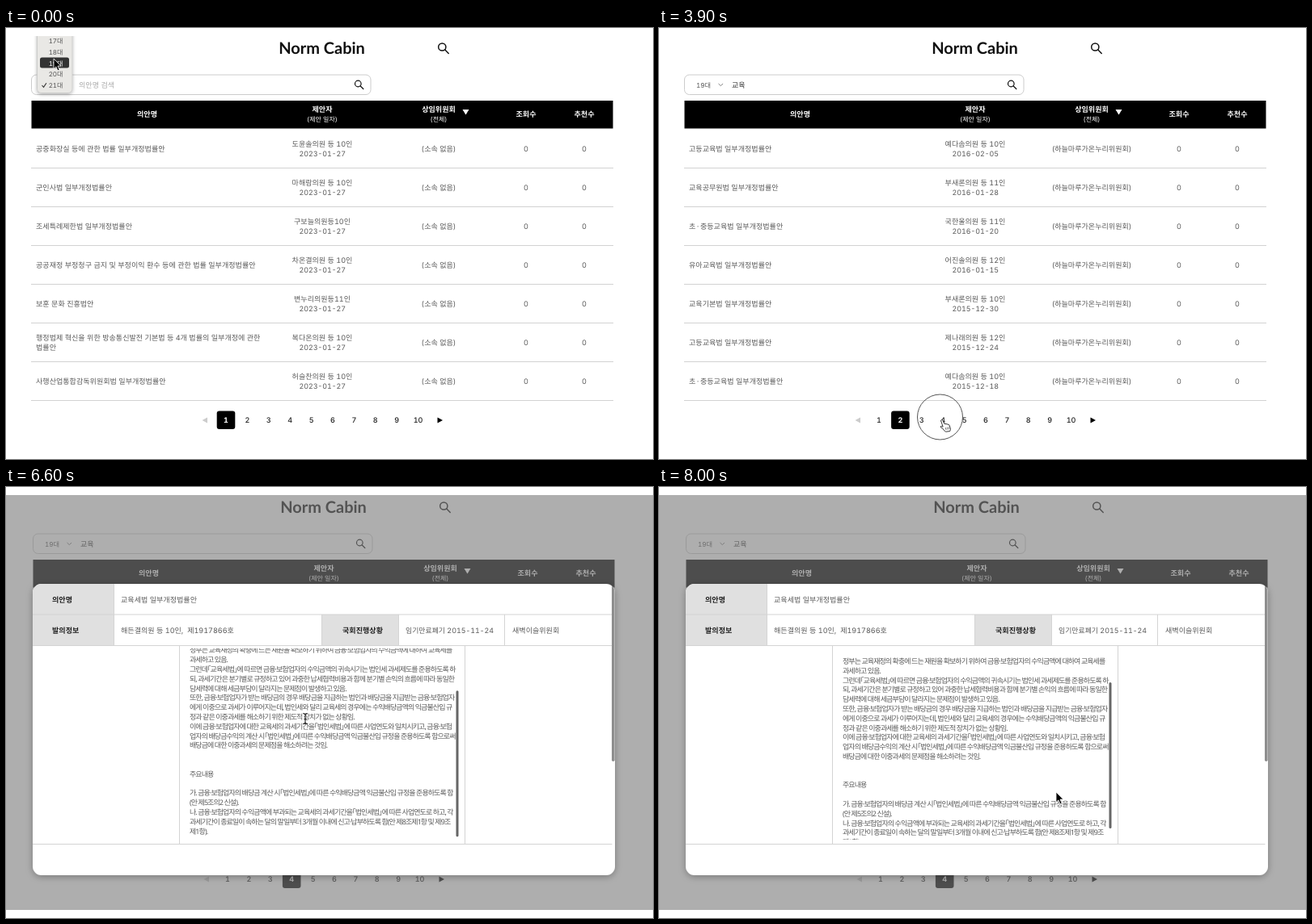
These frames come from a looping animation (800x534 px, 8.1 s). An HTML page:

```html
<!DOCTYPE html>
<html lang="ko">
<head>
<meta charset="utf-8">
<title>Norm Cabin</title>
<style>
  html, body { margin: 0; width: 100%; height: 100%; overflow: hidden; background: #fff; }
  svg { display: block; width: 100%; height: 100%; }
  text {
    font-family: Inter, "Noto Sans CJK KR", "Noto Sans CJK", sans-serif;
    font-size: 9.05px; fill: #5a5a5a; text-rendering: geometricPrecision;
    font-variant-numeric: tabular-nums; white-space: pre;
  }
  .mid { text-anchor: middle; }
  .bold { font-weight: 700; }
  .logo { font: 700 20px Lato, sans-serif; fill: #111; }
  .body text {
    font-family: "Noto Sans", "Noto Sans CJK KR", "Noto Sans CJK", sans-serif;
    font-size: 9px; letter-spacing: -.93px; font-feature-settings: "halt";
  }
  .body .bold { font-size: 9.05px; letter-spacing: -.15px; fill: #222; }
</style>
</head>
<body>
<svg id="stage" viewBox="0 0 800 534" preserveAspectRatio="none"></svg>
<script>
const LOOP = 8100, STEP = 100;

const COMMITTEES = {
  n: '소속 없음', h: '푸른솔빛위원회', f: '들꽃바람구름노을물결위원회',
  p: '새벽이슬위원회', i: '은빛모래언덕위원회', e: '하늘마루가온누리위원회'
};

// title | proposer | date | committee; "/" breaks a title
const LISTS = {
  recent: `공중화장실 등에 관한 법률 일부개정법률안|도윤솔의원 등 10인|2023-01-27|n
군인사법 일부개정법률안|마해람의원 등 10인|2023-01-27|n
조세특례제한법 일부개정법률안|구보늘의원등10인|2023-01-27|n
공공재정 부정청구 금지 및 부정이익 환수 등에 관한 법률 일부개정법률안|차온결의원 등 10인|2023-01-27|n
보훈 문화 진흥법안|변누리의원등11인|2023-01-27|n
행정법제 혁신을 위한 방송통신발전 기본법 등 4개 법률의 일부개정에 관한/법률안|복다온의원 등 10인|2023-01-27|n
사행산업통합감독위원회법 일부개정법률안|허슬찬의원 등 10인|2023-01-27|n`,
  term: `아동복지법 일부개정법률안|현새봄의원 등 10인|2016-05-12|h
자유무역협정 체결에 따른 농어업인 등의 지원에 관한 특별법 일부개정법률/안|추로운의원 등 13인|2016-04-29|f
조세특례제한법 일부개정법률안|고담별의원 등 21인|2016-04-29|p
자유무역협정 체결에 따른 농어업인 등의 지원에 관한 특별법 일부개정법률/안|호빛찬의원 등 13인|2016-04-29|f
대·중소기업 상생협력 촉진에 관한 법률 일부개정법률안|우든솔의원 등 20인|2016-04-29|i
아동복지법 일부개정법률안|소아름의원 등 15인|2016-04-27|h
약사법 일부개정법률안|설마루의원 등 10인|2016-04-19|h`,
  first: `지방교육자치에 관한 법률 일부개정법률안|라온별의원 등 27인|2016-03-29|e
지방교육정책 지원 특별회계법안|라온별의원 등 27인|2016-03-29|e
지방교육재정교부금법 일부개정법률안|라온별의원 등 27인|2016-03-29|e
교육기본법 일부개정법률안|어진솔의원 등 23인|2016-02-29|e
고등교육법 일부개정법률안|어진솔의원 등 23인|2016-02-29|e
초·중등교육법 일부개정법률안|어진솔의원 등 23인|2016-02-29|e
유아교육법 일부개정법률안|어진솔의원 등 23인|2016-02-29|e`,
  second: `고등교육법 일부개정법률안|예다솜의원 등 10인|2016-02-05|e
교육공무원법 일부개정법률안|부새론의원 등 11인|2016-01-28|e
초·중등교육법 일부개정법률안|국한울의원 등 11인|2016-01-20|e
유아교육법 일부개정법률안|어진솔의원 등 12인|2016-01-15|e
교육기본법 일부개정법률안|부새론의원 등 10인|2015-12-30|e
고등교육법 일부개정법률안|제나래의원 등 12인|2015-12-24|e
초·중등교육법 일부개정법률안|예다솜의원 등 10인|2015-12-18|e`,
  fourth: `고등교육법 일부개정법률안|예다솜의원 등 10인|2015-11-25|e
교육세법 일부개정법률안|해든결의원 등 10인|2015-11-24|p
초·중등교육법 일부개정법률안|국한울의원 등 11인|2015-11-20|e
교육공무원법 일부개정법률안|부새론의원 등 11인|2015-11-18|e
공장밀집지역 교육지원 특별법안|부새론의원 등 14인|2015-11-18|e
교육공무원법 일부개정법률안|부새론의원 등 11인|2015-11-13|e
고등교육법 일부개정법률안|제나래의원 등 12인|2015-11-11|e`
};

const BODY = `정부는 교육재정의 확충에 드는 재원을 확보하기 위하여 금융·보험업자의 수익금액에 대하여 교육세를
과세하고 있음.
그런데「교육세법」에 따르면 금융·보험업자의 수익금액의 귀속시기는 법인세 과세제도를 준용하도록 하
되, 과세기간은 분기별로 규정하고 있어 과중한 납세협력비용과 함께 분기별 손익의 흐름에 따라 동일한
담세력에 대해 세금부담이 달라지는 문제점이 발생하고 있음.
또한, 금융·보험업자가 받는 배당금의 경우 배당금을 지급하는 법인과 배당금을 지급받는 금융·보험업자
에게 이중으로 과세가 이루어지는데, 법인세와 달리 교육세의 경우에는 수익배당금액의 익금불산입 규
정과 같은 이중과세를 해소하기 위한 제도적 장치가 없는 상황임.
이에 금융·보험업자에 대한 교육세의 과세기간을「법인세법」에 따른 사업연도와 일치시키고, 금융·보험
업자의 배당금수익의 계산 시「법인세법」에 따른 수익배당금액 익금불산입 규정을 준용하도록 함으로써
배당금에 대한 이중과세의 문제점을 해소하려는 것임.


주요내용

가. 금융·보험업자의 배당금 계산 시「법인세법」에 따른 수익배당금액 익금불산입 규정을 준용하도록 함
(안 제5조의2 신설).
나. 금융·보험업자의 수익금액에 부과되는 교육세의 과세기간을「법인세법」에 따른 사업연도로 하고, 각
과세기간이 종료일이 속하는 달의 말일부터 3개월 이내에 신고·납부하도록 함(안 제8조제1항 및 제9조
제1항).`.split('\n');

// drawing helpers; y is the middle of the line
const text = (x, y, s, cls = '', style = '') =>
  `<text x="${x}" y="${y + 3.4}" class="${cls}" style="${style}">${s}</text>`;
const mid = (x, y, s, style, cls = '') => text(x, y, s, 'mid ' + cls, style);
const rect = (x, y, w, h, fill, more = '') =>
  `<rect x="${x}" y="${y}" width="${w}" height="${h}" fill="${fill}" ${more}/>`;
const path = (d, more) => `<path d="${d}" ${more}/>`;
const group = (id, inner, more = '') => `<g id="${id}" ${more}>${inner}</g>`;
const lens = (x, y, r, w) =>
  `<g fill="none" stroke="#111" stroke-width="${w}"><circle cx="${x}" cy="${y}" r="${r}"/>` +
  path(`M${x + r * .72} ${y + r * .72}l${r} ${r}`, 'stroke-linecap="round"') + '</g>';
const wideDot = s => s.replace('·', '<tspan dx="1.5" style="letter-spacing:1.5px">·</tspan>');

function row(line, i) {
  const [title, who, date, key] = line.split('|');
  const y = 149.5 + 48 * i, parts = title.split('/');
  return parts.map((s, k) => text(37, y + 12 * (k - (parts.length - 1) / 2), wideDot(s))).join('') +
    mid(391, y - 6, who) + mid(391.2, y + 6, date, 'font-size:8.9px') +
    mid(535, y, `(${COMMITTEES[key]})`);
}

function header() {
  const w = 'fill:#fff', s = 'fill:#fff;font-size:8px';
  return rect(31.5, 90, 719, 34.5, '#000') +
    mid(174.5, 107, '의안명', w, 'bold') +
    mid(391, 101, '제안자', w, 'bold') + mid(391, 113, '(제안 일자)', s) +
    mid(535, 101, '상임위원회', w, 'bold') + mid(535, 113, '(전체)', s) +
    path('M564.5 101h8l-4 6.5z', 'fill="#fff"') +
    mid(643, 107, '조회수', w, 'bold') + mid(715, 107, '추천수', w, 'bold');
}

function grid() {
  let out = '';
  for (let i = 0; i < 7; i++) {
    const y = 149.5 + 48 * i;
    out += rect(31, y + 23.5, 720, 1, '#d2d2d2') + mid(643, y, '0') + mid(715, y, '0');
  }
  return out;
}

const pageX = n => 272 + 26.4 * (n - 1);
function pager() {
  let out = path('M249 482.5v7l-6.5-3.5z', 'fill="#ccc"') + path('M533.5 482.5v7l6.5-3.5z', 'fill="#000"') +
    rect(-11.3, 474.5, 22.6, 22.5, '#000', 'id="active" rx="3"');
  for (let n = 1; n <= 10; n++) out += mid(pageX(n), 486, n, '', 'num');
  return out;
}

function popup() {
  let out = rect(38.5, 0, 43.5, 80.5, '#e9e8e5', 'rx="5" stroke="#bbb" stroke-width=".6" filter="url(#soft)"') +
    rect(42, 36.5, 36, 13, '#333', 'rx="2.5"');
  ['17대', '18대', '19대', '20대', '21대'].forEach((s, i) =>
    out += mid(61.5, 16 + 13.65 * i, s, `font-size:8px;fill:${i === 2 ? '#fff' : '#555'}`));
  return out + path('M44.5 71l2 2.4 3.4-5.2', 'fill="none" stroke="#333" stroke-width="1.1"');
}

function modal() {
  const line = '#d4d4d4', grey = '#e0e0e0', dark = 'fill:#222';
  const body = BODY.map((s, i) => text(227, 265.5 + 11.8 * i, s)).join('');
  return rect(33, 120, 720, 361, '#fff', 'rx="11" filter="url(#shade)"') +
    `<g clip-path="url(#card)">` +
    rect(33, 120, 100, 76.5, grey) + rect(390.5, 158, 95, 38.5, grey) +
    [157.5, 196, 442].map(y => rect(33, y, 716.5, 1, line)).join('') +
    rect(133, 120, 1, 76.5, line) +
    [390, 485, 616].map(x => rect(x, 158, 1, 38.5, line)).join('') +
    rect(749, 121, 3.6, 219, '#8e8e8e', 'rx="1.8"') + '</g>' +
    text(57, 139.5, '의안명', 'bold', dark) + text(57, 177.5, '발의정보', 'bold', dark) +
    mid(441, 177.5, '국회진행상황', dark, 'bold') +
    text(142, 139.5, '교육세법 일부개정법률안') +
    text(142, 177.5, '해든결의원 등 10인,\u00a0 제1917866호') +
    text(494, 177.5, '임기만료폐기 2015-11-24', '', 'font-size:8.9px') +
    text(626, 177.5, COMMITTEES.p) +
    group('content',
      rect(214, 197, 1, 245, line) + rect(567, 197, 1, 245, line) +
      '<g clip-path="url(#view)">' +
      group('scroll', text(227, 213.5, '교육세법 일부개정법률안(1917866)', 'bold') +
        text(227, 242, '제안이유') + body, 'class="body"') + '</g>' +
      rect(556.5, 204, 3, 181, '#666', 'id="bar" rx="1.5"'));
}

const CURSORS = {
  arrow: path('M0 0v12.6l2.9-2.7 2.1 4.9 2.1-.9-2.1-4.8h3.9z', 'fill="#000" stroke="#fff" stroke-width=".8"'),
  beam: path('M-2.8-6.5q2.8 0 2.8 2v9q0 2-2.8 2M2.8-6.5q-2.8 0-2.8 2M0 4.5q0 2 2.8 2M-1.6.8h3.2',
    'fill="none" stroke="#222" stroke-width="1.1"'),
  hand: path('M-.5 1.2Q.2-.3 1.6.7L4 5.6q1-1 2 .2 1-.7 1.9.4 1.3-.5 2 .8l1.4 3.7q.5 1.8-.6 3.9l-5.2.6q-2.3-1.5-3.8-4.1-2.9-1.1-2.6-2.3 1-1 3 .3z',
    'fill="#fff" stroke="#222" stroke-width=".9" stroke-linejoin="round"') +
    path('M5.3 10l.7 3M7.3 9.6l.7 3M9.2 9.2l.6 3', 'stroke="#222" stroke-width=".6"')
};

document.getElementById('stage').innerHTML =
  `<defs>
    <clipPath id="frame"><rect y="10" width="800" height="514"/></clipPath>
    <clipPath id="card"><rect x="33" y="120" width="720" height="361" rx="11"/></clipPath>
    <clipPath id="view"><rect x="215" y="200" width="346" height="237"/></clipPath>
    <filter id="soft"><feDropShadow dx="0" dy="1.5" stdDeviation="2" flood-opacity=".3"/></filter>
    <filter id="shade"><feDropShadow dx="0" dy="2" stdDeviation="4" flood-opacity=".3"/></filter>
  </defs><g clip-path="url(#frame)">` +
  group('page',
    text(390.5, 28.9, 'Norm Cabin', 'mid logo') + lens(539.3, 23.5, 4.6, 1.5) +
    rect(31.5, 58, 419.5, 24.5, '#fff', 'rx="6" stroke="#ccc"') +
    text(46, 70.5, '19대', '', 'font-size:8.2px') +
    path('M73.5 69l2.8 2.6 2.8-2.6', 'fill="none" stroke="#777" stroke-width=".9"') +
    `<text id="query" x="90" y="73.9"></text>` + lens(435.3, 69, 3.8, 1.2) +
    header() + grid() +
    Object.entries(LISTS).map(([k, v]) => group(k, v.split('\n').map(row).join(''))).join('') +
    pager()) +
  group('popup', popup()) +
  group('modal', rect(0, 10, 800, 514, '#7d7d7d', 'opacity=".62"') + modal()) +
  '<circle id="ring" fill="none" stroke="#555" stroke-width="1"/>' +
  Object.entries(CURSORS).map(([k, v]) => group(k, v)).join('') + '</g>';

// steps: [time, values...]
const POINTER = [
  [0, 59, 38, 'arrow'], [200, 61, 42, 'arrow'], [400, 100, 70, 'beam'], [900, 112, 71, 'beam'],
  [1000, 112, 71, 'beam'], [1400, 436, 70, 'arrow'], [1500, 439, 69, 'arrow'], [1700, 439, 69, 'arrow'],
  [1800, 439, 69, ''], [2100, 439, 69, ''], [2200, 447, 69, 'arrow'], [2300, 519, 68, 'arrow'],
  [3000, 519, 68, 'arrow'], [3100, 399, 384, 'arrow'], [3200, 330, 455, 'arrow'], [3300, 298, 485, 'hand'],
  [3500, 298, 485, 'hand'], [3700, 349, 485, 'hand'], [4300, 349, 485, 'hand'], [4400, 335, 420, 'arrow'],
  [4600, 264, 267, 'arrow'], [4800, 264, 267, 'arrow'], [5100, 111, 204, 'hand'], [5400, 111, 204, 'arrow'],
  [5500, 111, 204, 'arrow'], [5800, 260, 209, 'beam'], [6000, 327, 211, 'beam'], [6200, 327, 211, 'beam'],
  [6600, 370, 287, 'beam'], [7300, 370, 287, 'beam'], [7700, 480, 368, 'arrow'], [8000, 491, 378, 'arrow']
];
const SCROLL = [[0, 0], [6200, 0], [6500, 55], [6700, 72], [6800, 72], [7000, 30], [7200, 1.3],
  [7300, 3], [7500, 22], [7700, 38], [8000, 50]];
const LIST = [[0, 'recent'], [300, 'term'], [1600, 'first'], [3500, 'second'], [4000, 'fourth']];
const PAGE = [[0, 1], [3500, 2], [4000, 4]];
const QUERY = [[0, ''], [600, 'ㄱ'], [700, '교'], [800, '굥'], [900, '교육']];
const RING = [[0, 0], [1400, 16], [1500, 0], [3400, 28], [3500, 0], [3800, 18], [3900, 28], [4000, 0],
  [5200, 16], [5300, 28], [5400, 0]];

const at = (steps, t) => steps.findLast(s => s[0] <= t);
function blend(steps, t, k) {
  const a = at(steps, t), b = steps[steps.indexOf(a) + 1];
  return b ? a[k] + (b[k] - a[k]) * (t - a[0]) / (b[0] - a[0]) : a[k];
}
const $ = id => document.getElementById(id);
const show = (id, on) => $(id).style.display = on ? '' : 'none';
const nums = document.querySelectorAll('.num');

function draw(t) {
  const list = at(LIST, t)[1], page = at(PAGE, t)[1], query = at(QUERY, t)[1];
  const x = blend(POINTER, t, 1), y = blend(POINTER, t, 2), kind = at(POINTER, t)[3];
  const s = blend(SCROLL, t, 1);

  Object.keys(LISTS).forEach(k => show(k, k === list));
  show('popup', t < 100);
  show('modal', t >= 5400);
  show('content', t >= 5600);
  show('bar', t >= 6300);
  $('page').setAttribute('transform', `translate(${t >= 5400 ? 2 : 0} 0)`);
  $('query').textContent = query || '의안명 검색';
  $('query').style.fill = query ? '#333' : '#aaa';
  $('active').setAttribute('transform', `translate(${pageX(page)} 0)`);
  nums.forEach((n, i) => {
    n.style.fill = i + 1 === page ? '#fff' : '#222';
    n.style.fontWeight = i + 1 === page ? 700 : 500;
  });
  $('scroll').setAttribute('transform', `translate(0 ${-s})`);
  $('bar').setAttribute('y', 204 + s * .76);

  const ring = $('ring');
  ring.setAttribute('cx', x - 1.5);
  ring.setAttribute('cy', y - 3);
  ring.setAttribute('r', at(RING, t)[1]);
  Object.keys(CURSORS).forEach(k => {
    show(k, k === kind);
    $(k).setAttribute('transform', `translate(${x} ${y})`);
  });
}

const start = performance.now();
let last = -1;
function tick() {
  const t = Math.floor((performance.now() - start) % LOOP / STEP) * STEP;
  if (t !== last) draw(last = t);
  requestAnimationFrame(tick);
}
draw(0);
tick();
</script>
</body>
</html>
```
